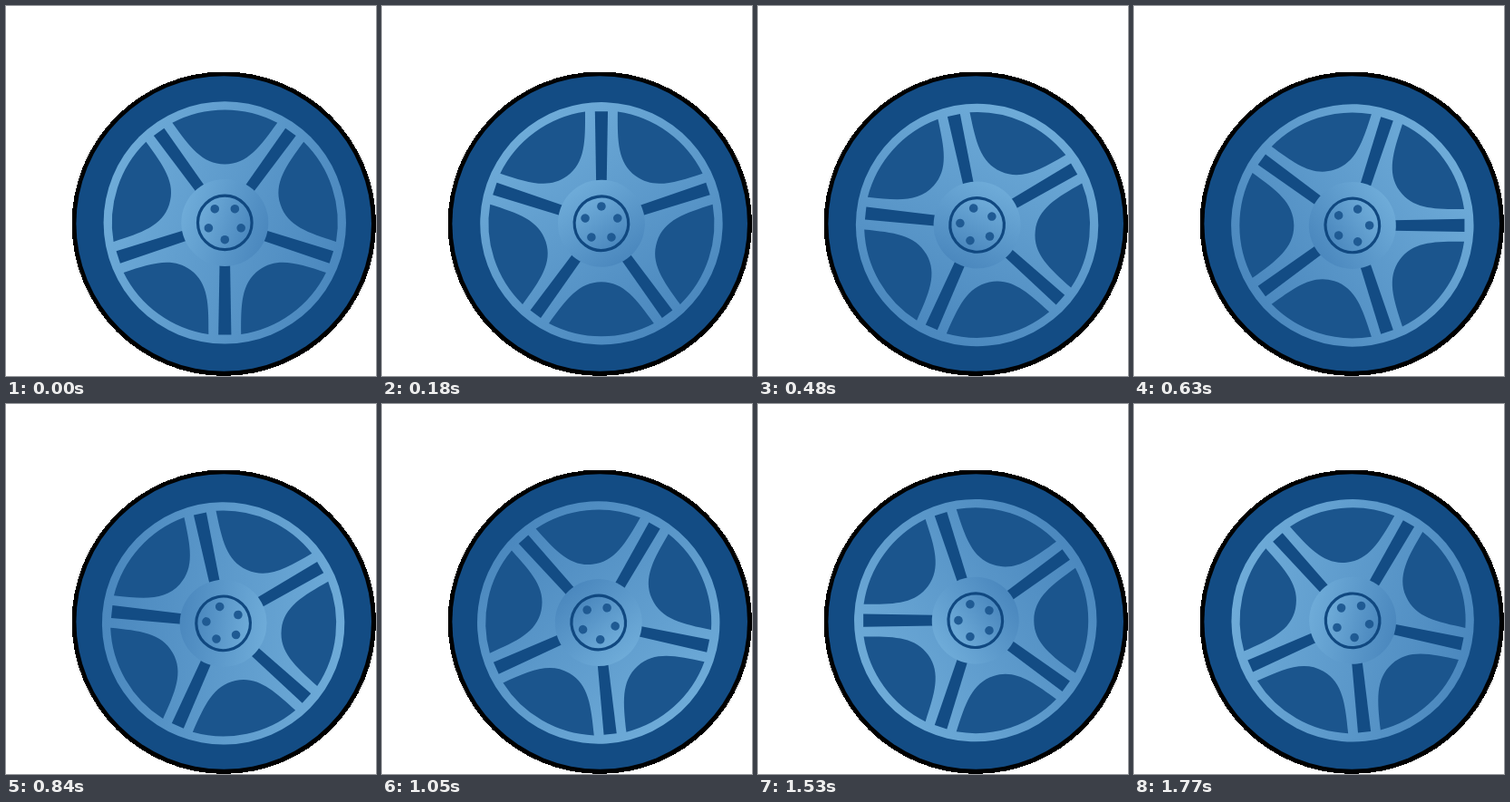
Write an HTML page that moves like this. It is 408 px wide and 408 px high and loops after 1.8 s.

```html
<!DOCTYPE html>
<html lang="en">
<head>
<meta charset="utf-8">
<title>Rolling wheel</title>
<style>
  html, body { margin: 0; width: 100%; height: 100%; overflow: hidden; background: #fff; }
  svg { display: block; width: 100vw; height: 100vh; }
</style>
</head>
<body>
<svg viewBox="0 0 408 408">
  <defs>
    <linearGradient id="metal" x1=".03" y1=".34" x2=".97" y2=".66">
      <stop offset="0" stop-color="#6eabd8"/>
      <stop offset="1" stop-color="#4b88be"/>
    </linearGradient>
    <linearGradient id="bolt" gradientUnits="userSpaceOnUse" x1="-23" y1="0" x2="23" y2="0">
      <stop offset="0" stop-color="#1c568e"/>
      <stop offset="1" stop-color="#235f98"/>
    </linearGradient>
  </defs>
  <circle cx="240.3" cy="240.2" r="167.7" shape-rendering="crispEdges"/>
  <circle cx="240.2" cy="240" r="162.8" fill="#134c84"/>
  <g id="wheel"></g>
</svg>
<script>
  const LOOP = 1800, STEP = 30, SPOKES = 5;
  const wheel = document.getElementById('wheel');

  // Drawn pointing up; each copy is turned around the hub.
  const opening = 'M-57.9-110.2C-39-84-25-64.5 0-64.5S39-84 57.9-110.2A124.5 124.5 0 0 0-57.9-110.2Z';
  const slot = 'M-5.8-46H5.8L7.1-123.6H-7.1Z';

  const around = (shape, start) => Array.from({ length: SPOKES }, (_, i) =>
    `<g transform="rotate(${start + i * 360 / SPOKES})">${shape}</g>`).join('');

  wheel.innerHTML =
    '<circle r="133.7" fill="url(#metal)"/>' +
    around(`<path d="${opening}" fill="#1b558d"/>`, 0) +
    around(`<path d="${slot}" fill="#134c84"/>`, 36) +
    '<circle r="48" fill="url(#metal)"/>' +
    '<circle r="29.8" fill="url(#metal)" stroke="#104880" stroke-width="3.2"/>' +
    around('<circle cy="-18.8" r="4.8" fill="url(#bolt)"/>', 36);

  function draw(time) {
    const angle = Math.floor(time % LOOP / STEP) * STEP / LOOP * 360;
    // The rim sits slightly off the axle, so it wobbles as it turns.
    wheel.setAttribute('transform', `translate(240.3 240.3) rotate(${angle}) translate(1 -1.4)`);
  }

  const begin = performance.now();
  function tick() {
    draw(performance.now() - begin);
    requestAnimationFrame(tick);
  }
  tick();
</script>
</body>
</html>
```
